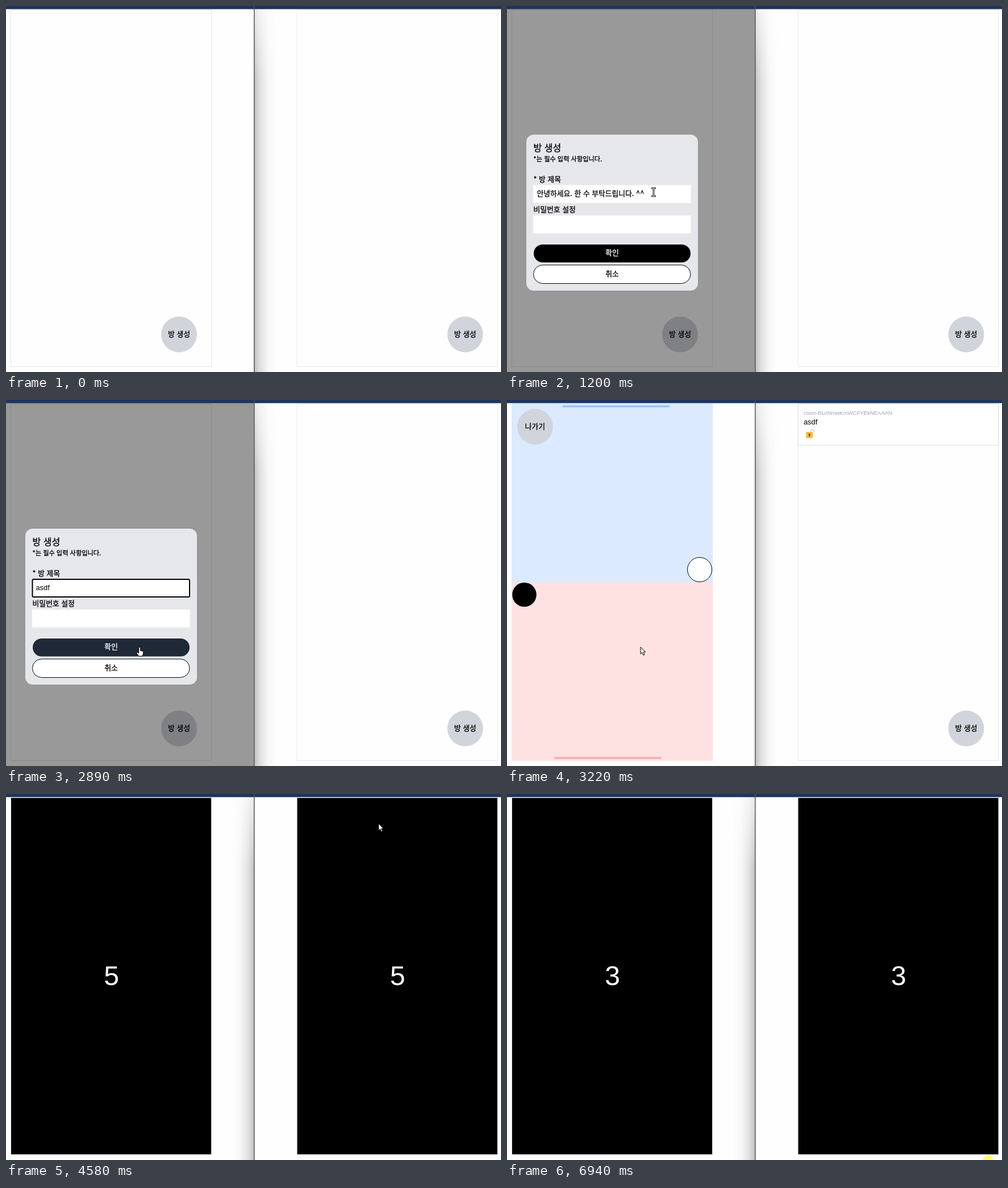
Write an HTML page that moves like this. It is 871 px wide and 643 px high and loops after 7.07 s.

```html
<!DOCTYPE html>
<html lang="ko">
<head>
<meta charset="utf-8">
<title>Room lobby</title>
<style>
  html, body { margin: 0; width: 100%; height: 100%; overflow: hidden; background: #fefefe; }
  svg { display: block; width: 871px; height: 643px; }
  .ko { font: 500 12.8px "Noto Sans CJK KR", "Noto Sans CJK", "Noto Sans KR", sans-serif; fill: #000; stroke: #000; stroke-width: .3px; }
  .mid { text-anchor: middle; }
  .title { font-size: 16px; }
  .small { font-size: 11.2px; }
  .light { fill: #fff; stroke: #fff; }
  .la { font: 12.8px "Liberation Sans", Arial, sans-serif; }
  .id { font-size: 9.5px; fill: #9ca3af; }
  .count { font-size: 48px; fill: #fff; text-anchor: middle; }
  .panel { fill: none; stroke: #e5e7eb; }
  .round { fill: #d1d5db; }
  .hover.round { fill: #9ca3af; }
  #ok.hover { fill: #1f2937; }
  #row.hover { fill: #f3f4f6; }
</style>
</head>
<body>
<svg viewBox="0 0 871 643" xmlns="http://www.w3.org/2000/svg">
  <defs>
    <linearGradient id="fade">
      <stop offset="0" stop-opacity=".24"/>
      <stop offset=".25" stop-opacity=".12"/>
      <stop offset=".6" stop-opacity=".03"/>
      <stop offset="1" stop-opacity="0"/>
    </linearGradient>
    <linearGradient id="drop" x2="0" y2="1">
      <stop offset="0" stop-color="#555"/>
      <stop offset=".2" stop-color="#fff"/>
    </linearGradient>
    <mask id="soft" maskUnits="userSpaceOnUse" x="0" y="5" width="40" height="638">
      <rect y="5" width="40" height="638" fill="url(#drop)"/>
    </mask>
    <g id="create">
      <circle class="round" cx="304.5" cy="577" r="31.5"/>
      <text class="ko mid" x="304.5" y="580.8">방 생성</text>
    </g>
  </defs>

  <rect width="871" height="643" fill="#fefefe"/>
  <g id="shadow"><rect y="5" width="40" height="638" fill="url(#fade)" mask="url(#soft)"/></g>

  <!-- left window -->
  <rect class="panel" x="8.5" y="6.5" width="353" height="627"/>
  <g id="lobby">
    <circle id="make" class="round" cx="304.5" cy="577" r="31.5"/>
    <text class="ko mid" x="304.5" y="580.8">방 생성</text>
  </g>
  <g id="modal">
    <rect y="5" width="437" height="638" fill-opacity=".4"/>
    <rect x="34" y="226" width="302" height="274" rx="13" fill="#e5e7eb"/>
    <text class="ko title" x="46.5" y="255.3">방 생성</text>
    <text class="ko small" x="46.5" y="272.8">*는 필수 입력 사항입니다.</text>
    <text class="ko" x="46.5" y="308.6">* 방 제목</text>
    <rect x="46" y="314.5" width="277.5" height="31.5" fill="#fff"/>
    <rect id="ring" x="46.5" y="315" width="276.5" height="31" rx="2" fill="#fff" stroke="#000" stroke-width="2"/>
    <text id="hint" class="ko" x="52.5" y="334">안녕하세요. 한 수 부탁드립니다. ^^</text>
    <text id="typed" class="la" x="52.5" y="334"></text>
    <rect id="caret" y="323" width="1" height="14"/>
    <text class="ko" x="46.5" y="362.2">비밀번호 설정</text>
    <rect x="46" y="368" width="277.5" height="31.5" fill="#fff"/>
    <rect id="ok" x="47" y="419" width="276" height="31.5" rx="15.75"/>
    <text class="ko mid light" x="185" y="438.3">확인</text>
    <rect x="46.5" y="455" width="276.5" height="32.5" rx="16.25" fill="#fff" stroke="#000"/>
    <text class="ko mid" x="185" y="474.6">취소</text>
  </g>
  <g id="game">
    <rect x="8" y="6" width="354" height="314" fill="#dbeafe"/>
    <rect x="8" y="320" width="354" height="314" fill="#fee2e2"/>
    <rect x="97.5" y="9.5" width="189" height="3.2" rx="1.6" fill="#93c5fd"/>
    <rect x="83" y="627.3" width="189" height="3.2" rx="1.6" fill="#fca5a5"/>
    <circle class="round" cx="49.5" cy="47" r="31.5"/>
    <text class="ko mid" x="49.5" y="51">나가기</text>
    <circle cx="339" cy="298" r="21.5" fill="#fff" stroke="#000"/>
    <circle id="paddle" r="21.3"/>
  </g>

  <!-- right window -->
  <rect class="panel" x="512" y="6.5" width="353" height="627"/>
  <use href="#create" x="503.5"/>
  <g id="entry">
    <rect id="row" x="512.5" y="6.5" width="352" height="73" fill="#fff" stroke="#e0e2e6"/>
    <text class="la id" x="522" y="26">room-BLnNmwKmWCFYEkNEAAAN</text>
    <text class="la" x="522" y="42.5">asdf</text>
    <path d="M534.3 57V54.5a2.9 2.9 0 0 1 5.8 0V56" fill="none" stroke="#c9ccd1" stroke-width="1.4"/>
    <rect x="526" y="56" width="12.4" height="11" rx="1.5" fill="#f8bd45"/>
    <path d="M532.2 59a1.5 1.5 0 0 1 .8 2.8v2.7h-1.6v-2.7a1.5 1.5 0 0 1 .8-2.8z" fill="#4a3a2a"/>
  </g>

  <g id="countdown">
    <rect x="8.5" y="6.5" width="353" height="627" stroke="#e5e7eb"/>
    <rect x="512" y="6.5" width="353" height="627" stroke="#e5e7eb"/>
    <text class="la count" x="185.5" y="336"></text>
    <text class="la count" x="689" y="336"></text>
  </g>

  <rect width="871" height="5.5" fill="#1c345e"/>
  <rect x="436" y="0" width="1.5" height="643" fill="#555"/>

  <g id="mouse">
    <circle id="press" cy="-1" cx="-1" r="9.7" fill="#fffa32" fill-opacity=".68"/>
    <path id="arrow" d="M0 0V12.2L2.8 9.6 4.9 14.3 7 13.4 5 8.8H8.8Z" fill="#fff" stroke="#000" stroke-width="1"/>
    <path id="hand" d="M-1.4 1Q0-.8 1.4 1V6.2L5.6 7.3Q7 7.8 6.8 9.5L6 13.5 5.2 16H-1.6L-5.3 10.6Q-5.6 8.8-3.6 9.2L-1.4 11Z" fill="#fff" stroke="#000" stroke-width="1"/>
    <g id="beam" fill="none">
      <path d="M-4-7H4M-4 7H4M0-7V7" stroke="#333" stroke-width="3"/>
      <path d="M-3-7H3M-3 7H3M0-7V7" stroke="#ddd" stroke-width="1"/>
    </g>
  </g>
</svg>
<script>
const LOOP = 7070, OPEN = 650, FOCUS = 1330, PLAY = 3220, ENTER = 4380, COUNT = 4580;
const $ = id => document.getElementById(id);
const digits = document.querySelectorAll('.count');

// start, end, number of steps, waypoints
const moves = [
  [130, 320, 4, [[632, 625], [470, 602], [350, 587], [302, 580]]],
  [780, 1200, 7, [[300, 565], [278, 430], [261, 340], [258, 327]]],
  [1270, 1270, 1, [[258, 330]]],
  [2690, 2890, 4, [[256, 350], [246, 394], [238, 424], [235, 434]]],
  [3360, 3770, 7, [[236, 435], [265, 420], [339, 359], [465, 235], [616, 82], [664, 30], [656, 51]]],
  [4580, 4580, 1, [[655.5, 52]]],
  [4840, 5460, 10, [[660, 68], [705, 220], [775, 460], [810, 580], [819, 608]]],
  [6670, 6940, 4, [[822, 612], [830, 622], [841, 635], [848, 645]]]
];
const presses = [[520, 650], [1330, 1470], [3160, 3220], [4380, 4510], [6940, 7070]];
const keys = [1940, 2070, 2200, 2340];

function place(t) {
  const m = moves.filter(m => t >= m[0]).pop();
  if (!m) return null;
  const [from, to, n, pts] = m;
  if (n === 1 || t >= to) return pts[pts.length - 1];
  const step = Math.floor((t - from) / (to - from) * (n - 1));
  const at = step / (n - 1) * (pts.length - 1);
  const i = Math.floor(at + 1e-6), f = Math.max(0, at - i), a = pts[i], b = pts[i + 1];
  return a.map((v, k) => v + (b[k] - v) * f);
}

const inside = ([x, y], l, t, r, b) => x >= l && x <= r && y >= t && y <= b;

function pointer(t, p) {
  if (t < OPEN) return Math.hypot(p[0] - 304.5, p[1] - 577) < 31.5 ? 'hand' : 'arrow';
  if (t < PLAY) {
    if (inside(p, 46, 314, 323, 346) || inside(p, 46, 368, 323, 399)) return 'beam';
    return inside(p, 46, 419, 323, 487) ? 'hand' : 'arrow';
  }
  return t < COUNT && inside(p, 512, 6, 865, 80) ? 'hand' : 'arrow';
}

const show = (id, on) => { $(id).style.display = on ? '' : 'none'; };
const hover = (id, on) => $(id).classList.toggle('hover', on);

function caretOn(t) {
  if (t < FOCUS) return false;
  const since = t < keys[0] ? t - FOCUS : Math.max(0, t - keys[3]);
  return since % 1000 < 500;
}

function draw(t) {
  const p = place(t), kind = p && pointer(t, p);
  show('mouse', p);
  if (p) {
    $('mouse').setAttribute('transform', `translate(${p[0]} ${p[1]})`);
    for (const k of ['arrow', 'hand', 'beam']) show(k, k === kind);
    show('press', presses.some(([a, b]) => t >= a && t < b));
  }

  show('lobby', t < PLAY);
  hover('make', t < OPEN && kind === 'hand');
  show('modal', t >= OPEN && t < PLAY);
  hover('ok', t >= OPEN && t < PLAY && kind === 'hand' && p[1] < 451);
  show('ring', t >= FOCUS);
  const text = 'asdf'.slice(0, keys.filter(k => t >= k).length);
  show('hint', !text);
  $('typed').textContent = text;
  show('caret', caretOn(t));
  const width = text && t < PLAY ? $('typed').getComputedTextLength() : 0;
  $('caret').setAttribute('x', 52 + width);

  show('game', t >= PLAY && t < COUNT);
  const q = t < 3360 ? [30.5, 342] : place(Math.min(t, 3510));
  $('paddle').setAttribute('cx', Math.min(q[0], 339));
  $('paddle').setAttribute('cy', Math.max(q[1], 342));
  show('entry', t >= PLAY && t < COUNT);
  hover('row', t >= ENTER);

  show('countdown', t >= COUNT);
  const left = t < 5590 ? 5 : t < 6600 ? 4 : 3;
  digits.forEach(d => { d.textContent = left; });
  $('shadow').setAttribute('transform', t < ENTER ? 'translate(437 0)' : 'translate(436.5 0) scale(-1 1)');
}

function tick() {
  draw(performance.now() % LOOP);
  requestAnimationFrame(tick);
}
tick();
</script>
</body>
</html>
```
